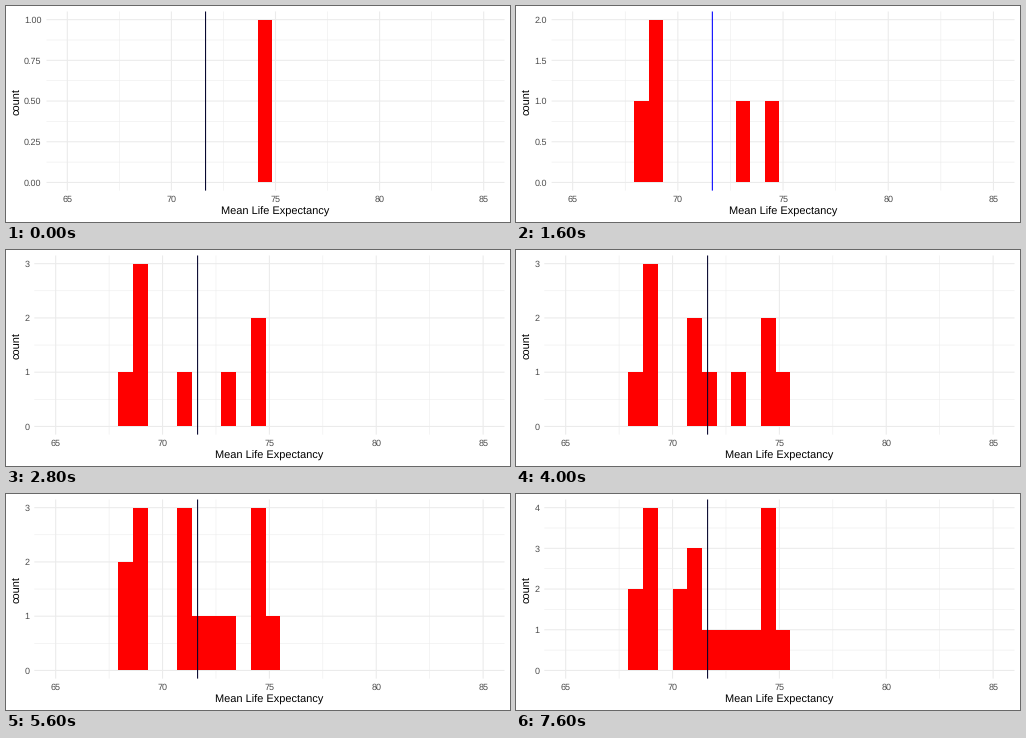
These frames come from a looping animation (504 by 216 pixels, 8000 ms). A matplotlib script:

```python
import matplotlib.pyplot as plt
import numpy as np
from matplotlib.animation import FuncAnimation
from matplotlib.patches import Rectangle

plt.rcParams.update({
    "font.family": "Liberation Sans",
    "text.hinting": "none",
    "text.hinting_factor": 1,
})

WIDTH, HEIGHT, DPI = 504, 216, 72
RIGHT, TOP, BOTTOM = 498.5, 5.5, 184.6
BIN = 20 / 29
MEAN = 71.64

# Histogram bin that gains one observation at each step
DRAWS = [108, 100, 99, 106, 100, 103, 108, 100, 103, 104,
         109, 108, 103, 99, 105, 108, 102, 102, 107, 100]

# Highest count: (tick step, label format, panel left, line colour)
SCALES = {
    1: (0.25, "{:.2f}", 40.5, "#05052d"),
    2: (0.5, "{:.1f}", 35.6, "#0000ff"),
    3: (1, "{:.0f}", 28.3, "#05052d"),
    4: (1, "{:.0f}", 28.3, "#05052d"),
}

fig = plt.figure(figsize=(WIDTH / DPI, HEIGHT / DPI), dpi=DPI, facecolor="white")
ax = fig.add_axes([0, 0, 1, 1])


def line(x, y, width, color="#ebebeb", z=1):
    ax.plot(x, y, color=color, lw=width, zorder=z, snap=False,
            solid_capstyle="butt")


def label(x, y, text, size=8.8, color="#4d4d4d", ha="center", rotation=0):
    ax.text(x, y, text, size=size, color=color, ha=ha, va="baseline",
            rotation=rotation, rotation_mode="anchor")


def draw(step):
    ax.clear()
    ax.set(xlim=(0, WIDTH), ylim=(HEIGHT, 0))
    ax.axis("off")

    bins, counts = np.unique(DRAWS[:step + 1], return_counts=True)
    peak = counts.max()
    tick, fmt, left, mean_color = SCALES[peak]

    def px(value):
        return left + (value - 64) / 22 * (RIGHT - left)

    def py(value):
        return BOTTOM - (value / peak + 0.05) / 1.1 * (BOTTOM - TOP)

    def vertical(value, width, **style):
        line([px(value)] * 2, [TOP, BOTTOM], width, **style)

    def horizontal(value, width):
        line([left, RIGHT], [py(value)] * 2, width)

    for value in np.arange(67.5, 85, 5):
        vertical(value, 0.53)
    for value in np.arange(tick / 2, peak, tick):
        horizontal(value, 0.53)
    for value in range(65, 86, 5):
        vertical(value, 1.07)
        label(px(value), 195.9, str(value))
    for value in np.arange(0, peak + tick / 2, tick):
        horizontal(value, 1.07)
        label(left - 4.95, py(value) + 3.15, fmt.format(value), ha="right")

    for index, count in zip(bins, counts):
        x0, x1 = (round(px((index + side) * BIN)) for side in (-0.5, 0.5))
        y0, y1 = round(py(count)), round(py(0))
        ax.add_patch(Rectangle((x0, y0), x1 - x0, y1 - y0, fc="red",
                               lw=0, antialiased=False, zorder=2))

    vertical(MEAN, 1.07, color=mean_color, z=3)
    label((left + RIGHT) / 2, 209, "Mean Life Expectancy", 11, "black")
    label(13.4, (TOP + BOTTOM) / 2, "count", 11, "black", rotation=90)
    return []


anim = FuncAnimation(fig, draw, frames=len(DRAWS), init_func=lambda: [],
                     interval=400, repeat=True, repeat_delay=0)
plt.show()
```
